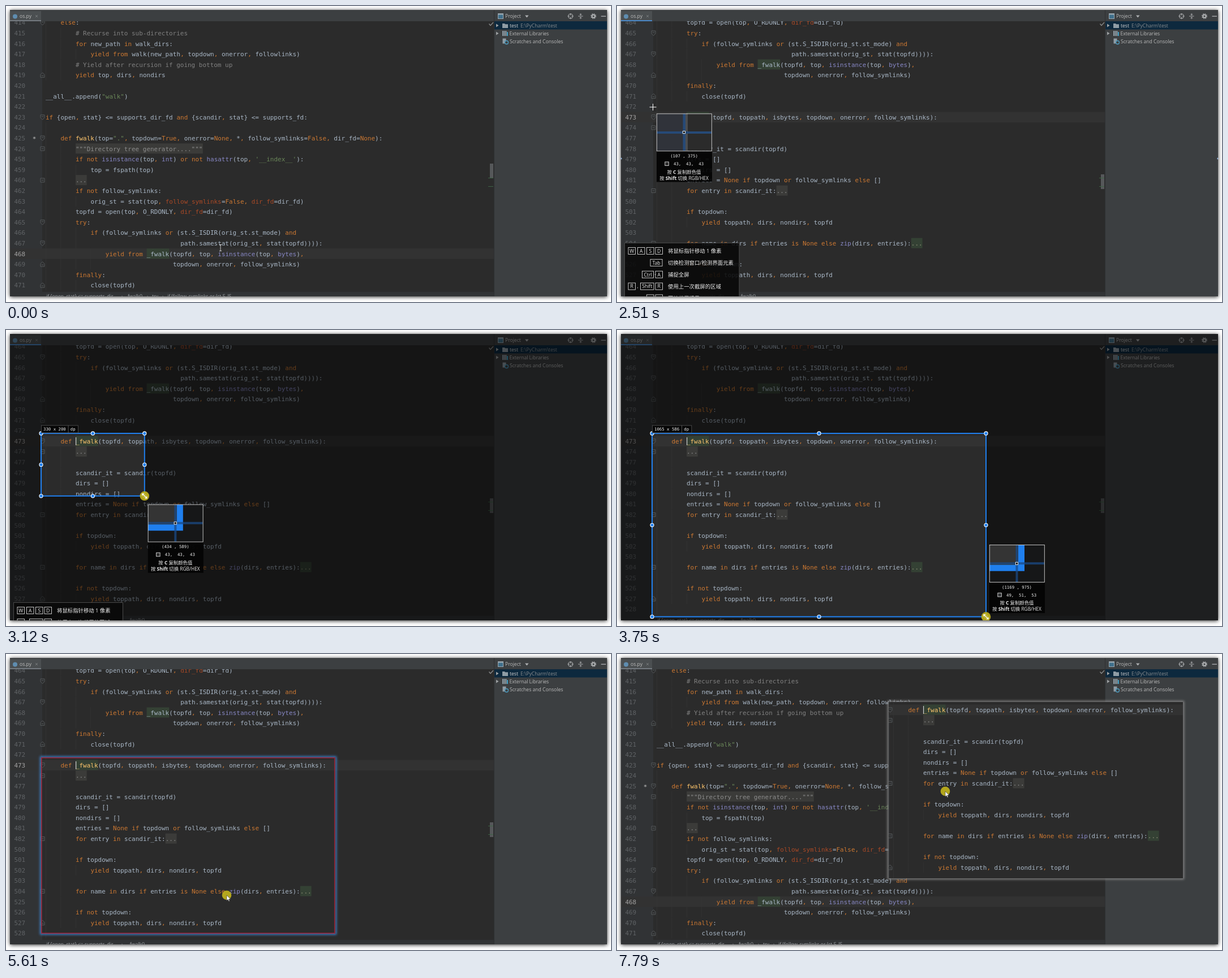
An HTML page for the animation above (8 s loop, 1069 px wide and 524 px high).

```html
<!DOCTYPE html>
<html lang="zh">
<head>
<meta charset="utf-8">
<title>Editor snip and pin</title>
<style>
html, body { margin: 0; width: 100%; height: 100%; overflow: hidden; background: #fff; }
svg { display: block; width: 1069px; height: 524px; }
.code { font: 10.987px "DejaVu Sans Mono", monospace; }
.ui { font: 8.6px "Open Sans", "Noto Sans", sans-serif; }
.tip { font: 9.4px "Open Sans", "Noto Sans CJK SC", "Noto Sans CJK", sans-serif; }
.small { font-size: 8.4px; }
.key { font-size: 8.6px; }
.num { font: 7.35px "DejaVu Sans Mono", monospace; }
.frame { filter: drop-shadow(0 1px 3.5px rgba(0, 0, 0, .85)); }
.glow { filter: blur(2px); }
</style>
</head>
<body>
<svg viewBox="0 0 1069 524">
  <defs id="defs"></defs>
  <rect class="frame" x="7" y="7" width="1055" height="507" fill="#3c3f41"/>
  <g id="stage" clip-path="url(#win)"></g>
</svg>
<script>
const LOOP = 8000, CW = 6.615, X0 = 70, ROW = 18.6, Y0 = 29.4;
const SCALE = 0.554, SEL = { x: 62, y: 183 }, PIN = { w: 520, h: 312 };
const BLUE = '#1f7fee';

// ---------- drawing helpers ----------
const esc = s => s.replace(/&/g, '&amp;').replace(/</g, '&lt;');
const rect = (x, y, w, h, fill, more = '') =>
  `<rect x="${x}" y="${y}" width="${w}" height="${h}" fill="${fill}" ${more}/>`;
const path = (d, stroke, width = 1, fill = 'none', more = '') =>
  `<path d="${d}" stroke="${stroke}" stroke-width="${width}" fill="${fill}" ${more}/>`;
const text = (x, y, s, fill, cls, more = '') =>
  `<text x="${x}" y="${y}" fill="${fill}" class="${cls}" ${more}>${esc(s)}</text>`;
const circle = (x, y, r, fill, more = '') =>
  `<circle cx="${x}" cy="${y}" r="${r}" fill="${fill}" ${more}/>`;
const group = (x, y, body) => `<g transform="translate(${x} ${y})">${body}</g>`;
const clip = (id, x, y, w, h) => `<clipPath id="${id}">${rect(x, y, w, h, '#000')}</clipPath>`;

// ---------- code: [line, fold mark, source] ----------
const shared = [
  [464, '', '        topfd = open(top, O_RDONLY, dir_fd=dir_fd)'],
  [465, 'v', '        try:'],
  [466, '', '            if (follow_symlinks or (st.S_ISDIR(orig_st.st_mode) and'],
  [467, 'v', '                                    path.samestat(orig_st, stat(topfd)))):'],
  [468, '', '                yield from _fwalk(topfd, top, isinstance(top, bytes),'],
  [469, '^', '                                  topdown, onerror, follow_symlinks)'],
  [470, '', '        finally:'],
  [471, '^', '            close(topfd)'],
];
const callRows = [
  [414, 'v', '    else:'],
  [415, '', '        # Recurse into sub-directories'],
  [416, '', '        for new_path in walk_dirs:'],
  [417, '', '            yield from walk(new_path, topdown, onerror, followlinks)'],
  [418, '', '        # Yield after recursion if going bottom up'],
  [419, '^', '        yield top, dirs, nondirs'],
  [420, '', ''],
  [421, '', '__all__.append("walk")'],
  [422, '', ''],
  [423, 'v', 'if {open, stat} <= supports_dir_fd and {scandir, stat} <= supports_fd:'],
  [424, '', ''],
  [425, 'v', '    def fwalk(top=".", topdown=True, onerror=None, *, follow_symlinks=False, dir_fd=None):'],
  [426, '+', '        «"""Directory tree generator...."""»'],
  [458, '', "        if not isinstance(top, int) or not hasattr(top, '__index__'):"],
  [459, '', '            top = fspath(top)'],
  [460, '+', '        «...»'],
  [462, '', '        if not follow_symlinks:'],
  [463, '', '            orig_st = stat(top, follow_symlinks=False, dir_fd=dir_fd)'],
  ...shared,
];
const defRows = [
  ...shared,
  [472, '', ''],
  [473, 'v', '    def _fwalk(topfd, toppath, isbytes, topdown, onerror, follow_symlinks):'],
  [474, '+', '        «...»'],
  [477, '', ''],
  [478, '', '        scandir_it = scandir(topfd)'],
  [479, '', '        dirs = []'],
  [480, '', '        nondirs = []'],
  [481, '', '        entries = None if topdown or follow_symlinks else []'],
  [482, '+', '        for entry in scandir_it:«...»'],
  [500, '', ''],
  [501, '', '        if topdown:'],
  [502, '', '            yield toppath, dirs, nondirs, topfd'],
  [503, '', ''],
  [504, '+', '        for name in dirs if entries is None else zip(dirs, entries):‹...›'],
  [525, '', ''],
  [526, '', '        if not topdown:'],
  [527, '^', '            yield toppath, dirs, nondirs, topfd'],
  [528, '', ''],
];

const TOKEN = new RegExp([
  '(?<comment>#.*)', '«(?<fold>.*?)»', '‹(?<hotFold>.*?)›', `(?<string>"[^"]*"|'[^']*')`,
  '(?<decl>(?<=def )\\w+)', '(?<usage>\\b_fwalk\\b)',
  '(?<keyword>\\b(?:if|else|for|in|is|not|or|and|def|try|finally|yield|from|None|True|False)\\b|,)',
  '(?<builtin>\\b(?:isinstance|hasattr|int|bytes|zip)\\b)',
  '(?<kwarg>\\b(?:follow_symlinks|dir_fd)(?==))',
].join('|'), 'g');
const INK = {
  plain: '#a9b7c6', comment: '#808080', fold: '#8c8c8c', hotFold: '#8f8f78', string: '#6a8759',
  decl: '#ffc66d', usage: '#a9b7c6', keyword: '#cc7832', builtin: '#8888c6', kwarg: '#aa4926',
};

function codeLine(src, y) {
  const isDef = src.trimStart().startsWith('def ');
  let col = 0, last = 0, out = '';
  const put = (s, kind) => {
    const x = X0 + col * CW, w = s.length * CW;
    const back = /fold/i.test(kind) ? (kind === 'fold' ? '#3b3b39' : '#344134')
      : s === '_fwalk' ? '#344134' : '';
    if (back) out += rect(x, y - 9.3, w, 18, back);
    const lead = s.length - s.trimStart().length;
    if (s.trim()) out += text(x + lead * CW, y + 4, s.trim(), INK[kind], 'code');
    col += s.length;
  };
  for (const m of src.matchAll(TOKEN)) {
    put(src.slice(last, m.index), 'plain');
    let [kind, s] = Object.entries(m.groups).find(e => e[1] !== undefined);
    if (kind === 'kwarg' && isDef) kind = 'plain';
    put(s, kind);
    last = m.index + m[0].length;
  }
  put(src.slice(last), 'plain');
  return out;
}

function foldMark(mark, y) {
  const shapes = {
    v: 'M-3.5-4h7v5l-3.5 3.5l-3.5-3.5zM-1.8-1h3.6',
    '^': 'M-3.5 4h7v-5l-3.5-3.5l-3.5 3.5zM-1.8 1h3.6',
    '+': 'M-3.5-3.5h7v7h-7zM-1.8 0h3.6',
  };
  return group(64.5, y, path(shapes[mark], '#5b5e60', 0.9, '#2d2e2f'));
}

const indentOf = s => s.length - s.trimStart().length;

function editor(id, rows, current, crumbs) {
  let out = rect(7, 27, 855, 487, '#2b2b2b') + rect(7, 27, 57, 487, '#313335');
  let level = 4;
  const now = rows.findIndex(r => r[0] === current);
  out += rect(7, Y0 + now * ROW - 9.3, 855, ROW, '#323232');
  rows.forEach(([line, mark, src], i) => {
    const y = Y0 + i * ROW;
    const shown = src || (rows.slice(i).find(r => r[2]) || [0, 0, '    '])[2];
    const indent = indentOf(shown);
    if (indent <= level + 8) level = indent;
    for (let c = 0; c < level; c += 4)
      out += rect(X0 + c * CW, y - 9.3, 0.7, ROW, '#363636');
    out += text(14.4, y + 4, String(line), line === current ? '#a4a3a3' : '#606366', 'code');
    if (line === 425) out += text(46.7, y + 5, '*', '#c4c4c4', 'code', 'font-weight="bold"');
    out += codeLine(src, y);
    if (mark) out += foldMark(mark, y);
  });
  if (current === 473) out += rect(123, 190, 1.2, 14, '#d0d0d0');
  out += rect(7, 506, 855, 8, '#313335');
  for (const [x, s] of crumbs) out += text(x, 517, s, '#a0a4a8', 'ui');
  // scrollbar, change marks and inspection tick
  out += rect(855, current === 473 ? 298 : 279, 6, 26, '#56585a');
  out += rect(852, 304, 9, 1, '#3d6345') + rect(852, 319, 9, 1, '#3d6345');
  out += path('M853.5 31.5l2.5 3l5-5.5', '#8a8d8f', 1.3);
  return `<g id="${id}">${out}</g>`;
}

function chrome() {
  const grey = '#afb1b3', soft = '#bbbbbb';
  const folder = path('M877 31h4l1.2 1.3h4.8v6.7h-10z', 'none', 0, '#8f9ca5');
  const play = y => path(`M866 ${y - 3}l4.5 3l-4.5 3z`, 'none', 0, '#9da0a2');
  return `<g id="chrome">` +
    rect(7, 7, 1055, 20, '#3c3f41') + rect(7, 9, 55, 18, '#4b4f51') +
    circle(16, 18.5, 4, '#5f8db0') +
    text(24, 21.3, 'os.py', soft, 'ui') + path('M52 16l4 4m0-4l-4 4', '#7d8082', 0.9) +
    rect(862, 7, 200, 507, '#3c3f41') + rect(862, 7, 1, 507, '#2e3032') +
    rect(863, 27, 199, 14.5, '#0d293e') +
    rect(869.5, 13.5, 9, 9, '#40708c', `stroke="#9aa7b0"`) + rect(869, 13, 10, 2.5, '#9aa7b0') +
    text(882, 21.3, 'Project', soft, 'ui') +
    path('M917 16.5h6.5l-3.2 4z', 'none', 0, grey) +
    circle(997.5, 18, 4, 'none', `stroke="${grey}" stroke-width="1.1"`) +
    path('M997.5 13v3.5m0 3v3.5m-5-5h3.5m3 0h3.5', grey, 1.1) +
    path('M1011 18h8.5M1015.3 13v3m0 4v3M1013.5 14.5l1.8 1.8l1.8-1.8M1013.5 21.5l1.8-1.8l1.8 1.8', grey, 1) +
    circle(1038, 18, 2.6, 'none', `stroke="${grey}" stroke-width="2"`) +
    circle(1038, 18, 4.2, 'none', `stroke="${grey}" stroke-width="1.4" stroke-dasharray="1.8 1.5"`) +
    rect(1051.5, 17.5, 8.5, 1.3, grey) +
    play(34.5) + folder + text(890, 37.6, 'test', '#d0d0d0', 'ui', 'font-weight="bold"') +
    text(909, 37.6, 'E:\\PyCharm\\test', '#8a8d8f', 'ui') +
    play(48.5) + [877, 879.7, 882.4].map(x => rect(x, 44, 2, 9, '#8f9ca5')).join('') +
    rect(885, 46, 2, 7, '#40a0c4') + text(889.5, 51.6, 'External Libraries', soft, 'ui') +
    path('M877.5 57.5h6v3l-2 6h-4z', 'none', 0, '#8f9ca5') +
    circle(884.5, 64.5, 3, '#3c3f41', 'stroke="#4c9cc0" stroke-width="1.3"') +
    text(890, 65.8, 'Scratches and Consoles', soft, 'ui') + `</g>`;
}

// ---------- snipping tool parts ----------
function keyCap(x, w, y, label) {
  return rect(x, y - 6, w, 12, '#0a0a0a', 'stroke="#d8d8d8" stroke-width="0.9"') +
    text(x + w / 2, y + 3.2, label, '#eee', 'tip key', 'text-anchor="middle"');
}
const HINTS = [
  [[[20, 'W'], [36.5, 'A'], [52.5, 'S'], [68, 'D']], '将鼠标指针移动 1 像素'],
  [[[59, 'Tab', 21]], '切换检测窗口/检测界面元素'],
  [[[44.5, 'Ctrl', 20], [68, 'A']], '捕捉全屏', [66.2, '-']],
  [[[20, 'R'], [41.5, 'Shift', 23.5], [68, 'R']], '使用上一次截屏的区域', [35.5, ',']],
  [[[52.5, ','], [68, '.']], '回放截屏记录'],
];
function hints(ids, top, width) {
  return rect(13.5, top, width, 110, 'rgba(8,8,8,.88)', 'stroke="#4a4a4a"') +
    ids.map((id, i) => {
      const y = top + 14 + i * 20.9, [keys, label, joint] = HINTS[id];
      return keys.map(([x, s, w = 12.5]) => keyCap(x, w, y, s)).join('') +
        (joint ? text(joint[0], y + 3, joint[1], '#ddd', 'tip key') : '') +
        text(90, y + 3.4, label, '#eee', 'tip');
    }).join('');
}

function magnifier(x, y, px, py, dragging) {
  const W = 97, H = 66, cx = 48.5, cy = 33;
  const cross = dragging ? 'rgba(26,74,134,.75)' : '#264a78';
  let view;
  if (dragging) {
    view = rect(0, 0, W, H, '#161718') + rect(0, 0, 51, 36, '#343434') +
      path('M56.5 0V41H0', BLUE, 11) +
      rect(0, 31, W, 4, cross) + rect(46.5, 0, 4, H, cross);
  } else {
    view = rect(0, 0, W, H, '#2b2b2b') + rect(0, 0, 47, H, '#30333a') +
      rect(51, 0, 4, H, '#4b4d4f') + rect(0, 31.5, W, 4, cross) + rect(46.5, 0, 4.5, H, cross);
  }
  const rgb = dragging && py > 900 ? [49, 51, 53] : [43, 43, 43];
  const mid = 'text-anchor="middle"';
  return group(x, y,
    rect(0, 66, 98, 55, 'rgba(4,4,4,.92)') +
    `<svg width="${W}" height="${H}">${view}</svg>` +
    rect(0.3, 0.3, W, H, 'none', 'stroke="#d4d4d4" stroke-width="0.9"') +
    rect(cx - 2.2, cy - 2, 4.2, 4.2, '#111', 'stroke="#fff" stroke-width="0.9"') +
    text(cx, 77.5, `(${px} , ${py})`, '#eee', 'num', mid) +
    rect(14.8, 85.5, 6.5, 6.5, `rgb(${rgb})`, 'stroke="#ddd" stroke-width="0.9"') +
    text(30, 91.7, rgb.join(',\u00a0\u00a0'), '#eee', 'num') +
    `<text x="${cx}" y="106" fill="#eee" class="tip small" ${mid}>按 <tspan font-weight="bold">C</tspan> 复制颜色值</text>` +
    `<text x="${cx}" y="117" fill="#eee" class="tip small" ${mid}>按 <tspan font-weight="bold">Shift</tspan> 切换 RGB/HEX</text>`);
}

function sizeTag(w, h) {
  const label = `${w} x ${h}`, end = 66 + label.length * 4.43;
  return rect(62.5, 169, end + 21.5 - 62.5, 13, '#060606', 'stroke="#555" stroke-width="0.8"') +
    text(66, 178.2, label, '#eee', 'num') + rect(end + 3.8, 169, 0.8, 13, '#666') +
    text(end + 8, 178.2, 'dp', '#eee', 'num');
}

function toolbar(x) {
  const ink = '#33373a', pale = '#7d8286';
  const tools = [
    'M-5-4h8v6h-8zM-1 0h6v6h-6z', 'M-5 3l4-5l3 3l4-4', 'M-4 4l7-7m-4.5 0h4.5v4.5',
    'M-4 5l1-3l6-6l2 2l-6 6z', 'M-4 4l3-6l2-2l3 4l-4 3zM0-3l3 4', 'M-4-4h8v8h-8z',
    'M-4-4h8M0-4v9', 'M-4 2l5-5l4 3l-5 5z', 'M-4-1l3-3m-3 3l3 3m-3-3h6q3 1 3 5',
    'M4-1l-3-3m3 3l-3 3m3-3h-6q-3 1-3 5', 'M-3.5-3.5l8 8m0-8l-8 8', 'M0-4l4 4l-3 1l-2 3l-4-4l3-2zM-2 2l-3 3',
    'M-4-4h8v8h-8zM-2-4v3h4v-3', 'M-4-4h6v8h-6zM-1-2h5v8h-5z',
  ];
  const gaps = i => i * 22.2 + (i > 7 ? 2 : 0) + (i > 9 ? 2.5 : 0);
  return group(x, 501, rect(0, 0, 316, 18, '#b7babc') + rect(272, 0, 21, 18, '#8d9194') +
    tools.map((d, i) => group(11 + gaps(i), 10,
      path(d, i === 8 || i === 9 ? pale : ink, 1.2, i === 7 || i === 11 ? ink : 'none') +
      (i === 5 ? rect(-4, -4, 4, 4, ink) + rect(0, 0, 4, 4, ink) : ''))).join(''));
}

function selection({ sel: [w, h], bar }) {
  const { x, y } = SEL, sw = w * SCALE, sh = h * SCALE, r = x + sw, b = y + sh;
  const big = sw > 60;
  let out = rect(7, 7, 1055, 507, 'rgba(0,0,0,.5)') + clip('cut', x, y, sw, sh) +
    `<g clip-path="url(#cut)"><use href="#defView"/></g>` +
    rect(x, y, sw, sh, 'none', `stroke="${BLUE}" stroke-width="2"`);
  if (big)
    for (const i of [0, 0.5, 1]) for (const j of [0, 0.5, 1])
      if (i !== 0.5 || j !== 0.5)
        out += circle(x + sw * i, y + sh * j, 3.1, BLUE, 'stroke="#fff" stroke-width="1.1"');
  out += sizeTag(w, h);
  if (bar) return out + toolbar(r - 317);
  if (b < 470) out += hints([0, 3], 482.5, 193);
  const my = b + 136 > 514 ? b - 127.5 : b + 15;
  return out + magnifier(r + 6, my, 104 + w, 389 + h, true);
}

function hover([x, y]) {
  const px = Math.round((x - 4.2) / SCALE), py = Math.round((y + 28.7) / SCALE);
  return hints([0, 1, 2, 3, 4], 419.5, 202.5) +
    circle(7, 270, 1.6, '#9cc4f4') + circle(1062, 270, 1.6, '#9cc4f4') +
    magnifier(x + 6.5, y + 11.5, px, py, false);
}

function pinned([dx, dy], focused) {
  const box = (fill, more) => rect(SEL.x, SEL.y, PIN.w, PIN.h, fill, more);
  const edge = focused
    ? box('none', 'class="glow" stroke="#3f7fc8" stroke-width="4"')
    : box('none', 'class="glow" stroke="#8a8a8a" stroke-width="4"');
  return group(dx, dy, edge + `<g clip-path="url(#pinBox)"><use href="#defView"/></g>` +
    (focused ? rect(62.8, 183.8, 518, 310.5, 'none', 'stroke="#b3263f" stroke-width="1.3"') : ''));
}

function pointer([x, y, type, ring]) {
  const shapes = {
    beam: path('M-2-5.5h4M0-5.5v11M-2 5.5h4', '#d8d8d8', 0.9),
    cross: path('M-6 0h12M0-6v12', '#fff', 1),
    resize: path('M-4-4l8 8M-4-.8v-3.2h3.2M4 .8v3.2h-3.2', '#fff', 1.3),
    arrow: path('M0 0v9.6l2.2-2l1.5 3.4l1.5-.7l-1.5-3.2h3z', '#333', 0.6, '#fff'),
  };
  return group(x, y, (ring ? circle(0, 0, 8.3, '#c2b41c', 'opacity=".9"') : '') + shapes[type]);
}

// ---------- timeline: every step holds until the next ----------
const corner = (w, h) => [SEL.x + w * SCALE, SEL.y + h * SCALE, 'resize', 1];
const drag = (t, w, h) => ({ t, view: 'def', sel: [w, h], cur: corner(w, h) });
const carry = (t, dx, dy) => ({ t, view: 'def', pin: [dx, dy], focus: 1, cur: [390 + dx, 427 + dy, 'arrow', 1] });
const rest = (t, x, y, ring) => ({ t, view: 'call', pin: [418, -98], cur: [x, y, 'arrow', ring] });
const snip = (t, x, y) => ({ t, view: 'def', hover: 1, cur: [x, y, 'cross'] });
const steps = [
  { t: 0, view: 'call', cur: [379, 428, 'beam'] },
  { t: 290, view: 'call', cur: [315, 434, 'beam'] },
  { t: 610, view: 'call', cur: [270, 439, 'beam', 1] },
  { t: 930, view: 'def', cur: [270, 439, 'beam'] },
  { t: 1240, view: 'def', cur: [262, 425, 'beam'] },
  { t: 1560, view: 'def', cur: [225, 360, 'beam'] },
  snip(1880, 160, 270), snip(2200, 92, 205), snip(2510, 63.5, 179),
  drag(2800, 51, 43), drag(3120, 330, 200), drag(3440, 780, 450), drag(3750, 1065, 586), drag(4050, 985, 572),
  { t: 4360, view: 'def', sel: [939, 563], bar: 1, cur: [570, 497, 'arrow'] },
  { t: 4660, view: 'def', sel: [939, 563], bar: 1, cur: [543.5, 502.5, 'arrow'] },
  { t: 4980, view: 'def', pin: [0, 0], focus: 1, cur: [525, 505, 'arrow'] },
  { t: 5290, view: 'def', pin: [0, 0], focus: 1, cur: [440, 455, 'arrow'] },
  carry(5610, 0, 0), carry(5910, 150, -35), carry(6230, 330, -78), carry(6540, 418, -98),
  rest(6860, 720, 300), rest(7170, 650, 270), rest(7480, 600, 250), rest(7790, 580, 243, 1),
];

function draw(s) {
  const blueTab = s.view === 'def' && !s.pin;
  return `<use href="#${s.view}View"/><use href="#chrome"/>` +
    rect(7, 25, 55, 2, blueTab ? '#4a88c7' : '#747a80') +
    (s.pin ? pinned(s.pin, s.focus) : '') +
    (s.sel ? selection(s) : '') +
    (s.hover ? hover(s.cur) : '') + pointer(s.cur);
}

const crumb = 'if {open, stat} <= supports_dir…';
document.getElementById('defs').innerHTML =
  clip('win', 7, 7, 1055, 507) + clip('pinBox', SEL.x, SEL.y, PIN.w, PIN.h) +
  editor('callView', callRows, 468, [[71, crumb], [204, '›'], [215, 'fwalk()'], [249, '›'], [258, 'try'],
    [276, '›'], [285, 'if (follow_symlinks or (st.S_IS…']]) +
  editor('defView', defRows, 473, [[71, crumb], [204, '›'], [215, '_fwalk()']]) +
  chrome();

const stage = document.getElementById('stage');
const start = performance.now();
let shown = null;
function tick() {
  const t = Math.max(0, performance.now() - start) % LOOP;
  const step = steps.findLast(s => s.t <= t);
  if (step !== shown) stage.innerHTML = draw(shown = step);
  requestAnimationFrame(tick);
}
tick();
</script>
</body>
</html>
```
